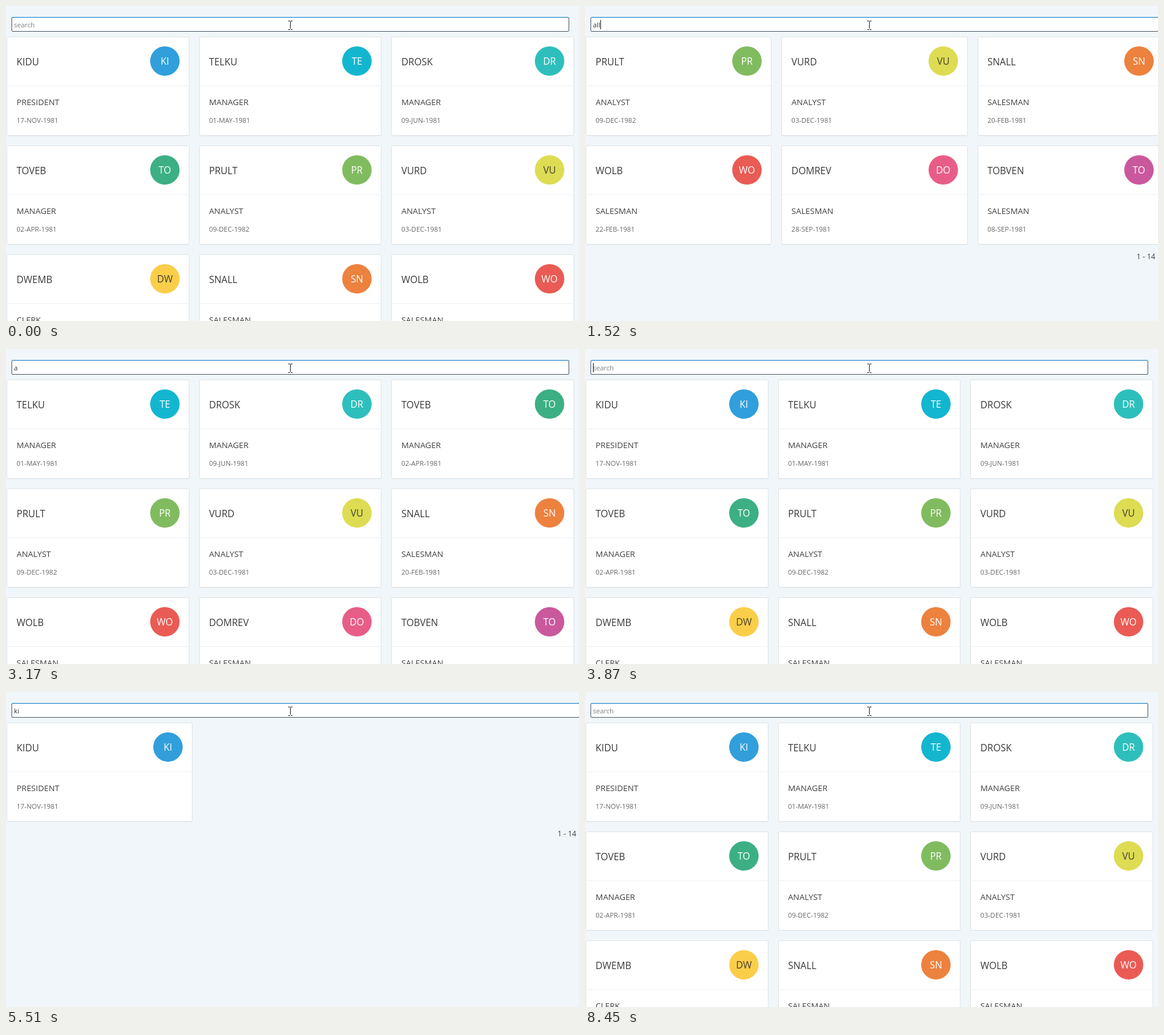
An HTML page for the animation above (8.76 s loop, 934 by 515 pixels).

```html
<!DOCTYPE html>
<html lang="en">
<head>
<meta charset="utf-8">
<title>Card search</title>
<style>
  html, body { margin: 0; width: 100%; height: 100%; overflow: hidden; background: #f0f6f9; }
  svg { display: block; font-family: "Open Sans", "Noto Sans", sans-serif; }
  .card { fill: #fff; stroke: #dfe5e8; }
  .shadow { fill: #e6ecef; }
  .rule { fill: #eff1f2; }
  .name { font-size: 15.5px; fill: #393939; }
  .job { font-size: 13.4px; fill: #404040; }
  .date { font-size: 11px; fill: #686868; }
  .badge { font-size: 15.5px; text-anchor: middle; }
  .pages { font-size: 12px; fill: #404040; }
  .typed { font-size: 11px; fill: #393939; }
  .typed.hint { fill: #808080; }
</style>
</head>
<body>
<svg width="934" height="515" viewBox="0 0 934 515">
  <rect width="934" height="515" fill="#f0f6f9"/>
  <rect id="field" x="9.5" y="18.5" height="23" rx="1.5" fill="#fff" stroke="#4d5963"/>
  <rect id="edge" x="10" y="18" height="1" fill="#0a7cc4"/>
  <text id="typed" x="13" y="35"></text>
  <rect id="caret" x="13" y="23" width="1" height="15" fill="#111"/>
  <path d="M460 24.5h3m1 0h3M463.5 25v12M460 38.5h3m1 0h3" fill="none" stroke="#222"/>
  <g id="cards"></g>
</svg>
<script>
const LOOP = 8760;
const WHITE = '#fff', DARK = '#45402f';

const staff = [
  ['KIDU', 'PRESIDENT', '17-NOV-1981', '#309fdb'],
  ['TELKU', 'MANAGER', '01-MAY-1981', '#13b6cf'],
  ['DROSK', 'MANAGER', '09-JUN-1981', '#2ebfbc'],
  ['TOVEB', 'MANAGER', '02-APR-1981', '#3caf85'],
  ['PRULT', 'ANALYST', '09-DEC-1982', '#81bb5f'],
  ['VURD', 'ANALYST', '03-DEC-1981', '#dddc53', DARK],
  ['DWEMB', 'CLERK', '17-DEC-1980', '#fbce4a', DARK],
  ['SNALL', 'SALESMAN', '20-FEB-1981', '#ed813e'],
  ['WOLB', 'SALESMAN', '22-FEB-1981', '#e95b54'],
  ['DOMREV', 'SALESMAN', '28-SEP-1981', '#e85d88'],
  ['TOBVEN', 'SALESMAN', '08-SEP-1981', '#ca589d'],
  ['UVAMS', 'CLERK', '12-JAN-1983', '#854e9b'],
  ['JUMOB', 'CLERK', '03-DEC-1981', '#5a68ad'],
  ['BOLTEM', 'CLERK', '23-JAN-1982', '#afbac5', '#4c525c']
].map(([name, job, date, color, ink = WHITE]) => ({ name, job, date, color, ink }));

// start time, typed text, query of the list below, caret visible
const steps = [
  [0, '', '', false], [520, '', '', true],
  [900, 'a', '', true], [970, 'a', 'a', true],
  [1300, 'al', 'a', true], [1370, 'al', 'al', true],
  [1520, 'all', 'al', true], [1620, 'all', 'all', true],
  [2070, 'all', 'all', false], [2620, 'all', 'all', true],
  [2690, 'al', 'all', true], [2770, 'al', 'al', true],
  [3020, 'a', 'al', true], [3100, 'a', 'a', true], [3170, 'a', 'a', false],
  [3640, '', 'a', false], [3700, '', 'a', true], [3870, '', '', true],
  [4260, '', '', false],
  [4590, 'k', '', true], [4640, 'k', 'k', true],
  [4960, 'ki', 'k', true], [5030, 'ki', 'ki', true],
  [5510, 'ki', 'ki', false], [6040, 'ki', 'ki', true],
  [6590, 'k', 'ki', true], [6670, 'k', 'k', true],
  [6820, '', 'k', true], [7050, '', '', true],
  [7350, '', '', false], [7900, '', '', true], [8450, '', '', false]
];

const el = id => document.getElementById(id);
const label = (cls, x, y, text, extra = '') =>
  `<text class="${cls}" x="${x}" y="${y}" ${extra}>${text}</text>`;

function card(person, i, pitch) {
  const x = 1 + pitch * (i % 3);
  const left = Math.round(x), right = Math.round(x + pitch - 17);
  const width = right - left;
  const top = 50 + 178 * Math.floor(i / 3);
  const textX = x + 16.3, cx = right - 39;
  return `<rect class="shadow" x="${left + 1}" y="${top + 162}" width="${width - 1}" height="1"/>
    <rect class="card" x="${left + .5}" y="${top + .5}" width="${width}" height="161" rx="1.5"/>
    <rect class="rule" x="${left + 1}" y="${top + 80}" width="${width - 1}" height="1"/>
    <circle cx="${cx}" cy="${top + 40}" r="24" fill="${person.color}"/>`
    + label('badge', cx, top + 46, person.name.slice(0, 2), `fill="${person.ink}"`)
    + label('name', textX, top + 47, person.name)
    + label('job', textX, top + 112, person.job)
    + label('date', textX, top + 141, person.date);
}

function drawList(query) {
  const q = query.toUpperCase();
  const found = staff.filter(p => p.name.includes(q) || p.job.includes(q));
  const narrow = found.length > 9; // a long list leaves room for a scrollbar
  const rows = Math.ceil(found.length / 3);
  el('cards').innerHTML = found.map((p, i) => card(p, i, narrow ? 313.6 : 319.3)).join('')
    + label('pages', 899, 58 + 178 * rows, '1 - 14');
  el('field').setAttribute('width', narrow ? 908 : 925);
  el('edge').setAttribute('width', narrow ? 907 : 924);
}

function drawInput(text, caretOn) {
  el('typed').textContent = text || 'search';
  el('typed').setAttribute('class', text ? 'typed' : 'typed hint');
  el('caret').setAttribute('x', text ? 16 + 3 * text.length : 13);
  el('caret').setAttribute('visibility', caretOn ? 'visible' : 'hidden');
}

let shown, shownQuery;
function render(time) {
  const step = steps.findLast(s => s[0] <= time);
  if (step === shown) return;
  shown = step;
  const [, text, query, caretOn] = step;
  drawInput(text, caretOn);
  if (query !== shownQuery) drawList(shownQuery = query);
}

const start = performance.now();
function tick() {
  render((performance.now() - start) % LOOP);
  requestAnimationFrame(tick);
}
tick();
</script>
</body>
</html>
```
